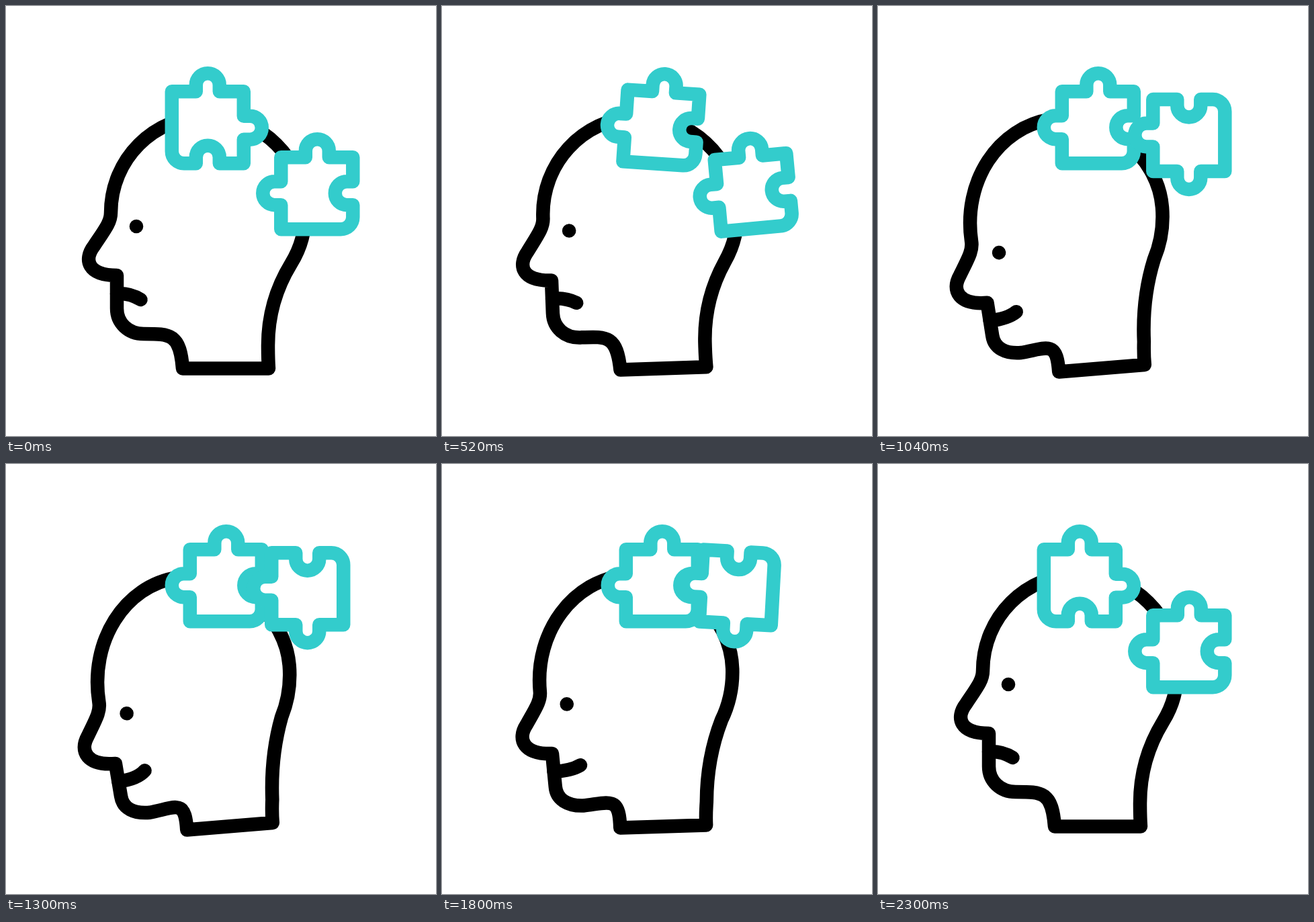
An HTML page that plays this animation: 640 by 640 pixels, repeating every 2.4 s.

```html
<!DOCTYPE html>
<html lang="en">
<head>
<meta charset="utf-8">
<title>Puzzle head</title>
<style>
  html, body { margin: 0; width: 100%; height: 100%; overflow: hidden; background: #fff; }
  svg { display: block; width: 100%; height: 100%; }
  path { stroke-width: 20.5; stroke-linejoin: round; stroke-linecap: round; }
  #head path { fill: none; stroke: #000; }
  .piece { fill: #fff; stroke: #33cccc; }
</style>
</head>
<body>
<svg viewBox="0 0 640 640">
  <g id="head">
    <path id="outline"/>
    <path id="mouth"/>
    <circle id="eye" r="10.3"/>
  </g>
  <path id="front" class="piece"/>
  <path id="back" class="piece"/>
</svg>
<script>
const LOOP = 2400;
const $ = id => document.getElementById(id);
const set = (id, name, value) => $(id).setAttribute(name, value);

const OUTLINE = `M391 539.5 C390 525 390 518 390 505
  C390 462 402 420 424 384 C440 358 445 335 445 308
  C445 228 380 164 300 164 C220 164 156 228 156 308
  C156 322 147 333 131 357 C115 378 122 401 165 401
  L165 450 C165 472 182 488 205 488 C245 488 259 488 263 539.5 Z`;

const side = 'a17.5 17.5 0 0';
const PIECE = `M-67 -40 H-31 V-49.5 ${side} 1 35 0 V-40 H40 V-3.5 H49.5 ${side} 1 0 35
  H40 V67 H4 V58 ${side} 0 -35 0 V67 H-49 a18 18 0 0 1 -18 -18 Z`;

// Smooth step from 0 at a to 1 at b; a may be greater than b.
function ramp(v, a, b) {
  const u = Math.min(1, Math.max(0, (v - a) / (b - a)));
  return u * u * (3 - 2 * u);
}

// Rises over a..b, falls over c..d.
const pulse = (t, a, b, c, d) => ramp(t, a, b) - ramp(t, c, d);

// The nod shears the head forward and drops the face; the neck base stays put.
function bend(x, y, nod) {
  const free = ramp(y, 540, 456);
  const rear = ramp(x, 400, 440);
  const face = ramp(x, 270, 235) * ramp(y, 110, 308);
  const dx = 0.085 * (y - 400) * (1 - rear) - 10 * rear;
  return [x + nod * free * dx, y + nod * free * face * 31.5];
}

const bendPath = (d, nod) =>
  d.replace(/([\d.]+) ([\d.]+)/g, (_, x, y) => bend(+x, +y, nod).join(' '));

function draw(t) {
  const nod = pulse(t, 390, 1230, 1600, 2300);
  const smile = `M165 428 Q${185 + 8 * nod} 427 ${200.5 + 6 * nod} ${437 - 22 * nod}`;
  const [eyeX, eyeY] = bend(194, 328, nod);
  const tilt = -4.7 * pulse(t, 150, 1000, 1392, 2084);
  set('outline', 'd', bendPath(OUTLINE, nod));
  set('mouth', 'd', bendPath(smile, nod));
  set('eye', 'cx', eyeX);
  set('eye', 'cy', eyeY);
  set('head', 'transform', `rotate(${tilt} 327 466)`);

  const frontTurn = -90 * pulse(t, 0, 595, 1822, 2300);
  set('front', 'transform', `translate(313.8 167.2) rotate(${frontTurn})`);

  // The back piece turns, lifts, then slides in to join.
  const backTurn = -90 - 90 * pulse(t, 470, 815, 1740, 2285);
  const x = 449.3 - 24.3 * pulse(t, 1080, 1480, 1905, 2130);
  const y = 265.2 - 59.2 * pulse(t, 780, 1040, 1740, 2285)
                  - 11.8 * pulse(t, 1080, 1480, 1740, 2285);
  set('back', 'transform', `translate(${x} ${y}) rotate(${backTurn})`);
}

set('front', 'd', PIECE);
set('back', 'd', PIECE);

const start = performance.now();
function tick() {
  draw((performance.now() - start) % LOOP);
  requestAnimationFrame(tick);
}
tick();
</script>
</body>
</html>
```
